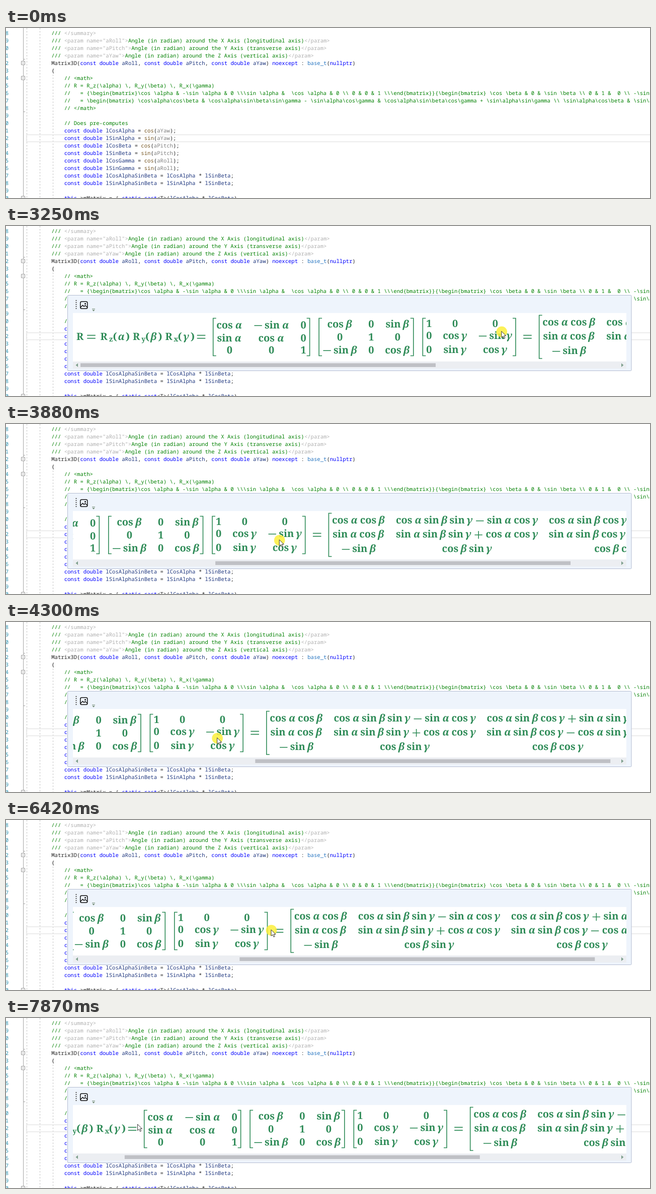
An HTML page for the animation above (8000 ms loop, 1280 by 340 pixels).

```html
<!DOCTYPE html>
<html lang="en">
<head>
<meta charset="utf-8">
<title>Formula preview in a code editor</title>
<style>
html, body { margin: 0; width: 100%; height: 100%; overflow: hidden; background: #fff; }
svg { display: block; }
text { white-space: pre; text-rendering: geometricPrecision; }
#code { font: 10.605px "Noto Sans Mono", monospace; }
#math { font: bold 20px "Noto Serif", serif; fill: #2e8b57; }
#math path { fill: none; stroke: #2e8b57; stroke-width: 1.6; }
#math .greek { font-style: italic; }
#math .sub { font-size: 14px; }
</style>
</head>
<body>
<svg width="1280" height="340" viewBox="0 0 1280 340">
  <clipPath id="view"><rect x="133" y="174" width="1100" height="96"/></clipPath>
  <path id="mark" fill="#eeeef7" stroke="#f0a0a0" visibility="hidden"
    d="M39.5 108.5H172.5V93.5H186.5V108.5H428.5V123.5H1290V153.5H180.5V168.5H39.5Z"/>
  <g fill="none" stroke="#c4c4c4">
    <path stroke-dasharray="3 3" d="M41.5 0V340M67.5 0V340M93.5 93V340"/>
    <path stroke="#e6e6e6" stroke-width="1.5" d="M1290 213.6H41V227.4H1290"/>
    <path stroke="#a5a5a5" d="M34.5 0V62.5H38M34.5 62V66M34.5 74V96M34.5 104V167.5H38M34.5 167V336"/>
    <path stroke="#999" id="folds"/>
  </g>
  <g id="code"></g>
  <g id="popup" visibility="hidden">
    <rect x="122.5" y="138.5" width="1120.5" height="151" rx="1.5" fill="#eef4fc" stroke="#b3bcd2"/>
    <rect x="133" y="174" width="1100" height="97" fill="#fff"/>
    <rect x="133" y="271" width="1100" height="14" fill="#eceef2"/>
    <path stroke="#555" stroke-width="2" stroke-dasharray="2 2" d="M139.5 148V167"/>
    <g fill="none" stroke="#111" stroke-width="1.5">
      <rect x="147.8" y="151.3" width="14" height="14" rx="2.5"/>
      <path d="M148 163L152.5 158.5L155 161L157.5 159L162 163"/>
      <circle cx="157.5" cy="155.5" r=".8"/>
    </g>
    <path fill="#5f7a5f" d="M171 165.5H177V166.5H171ZM171.5 168H176.5L174 170.5Z"/>
    <path fill="#7fa08e" d="M143 274.5V282L138.5 278.2ZM1223 274.5V282L1227.5 278.2Z"/>
    <rect id="thumb" x="148" y="274.5" width="706" height="7.5" fill="#bfc0c5"/>
    <g clip-path="url(#view)"><g id="math"></g></g>
  </g>
  <g id="mouse">
    <circle id="press" cx="1" cy="1.5" r="10.8" fill="#fbee3c" fill-opacity=".85" visibility="hidden"/>
    <path id="arrow" fill="#fff" stroke="#222" stroke-width=".9" visibility="hidden"
      d="M.5 .5V13L3.5 10.3L5.6 15L7.7 14L5.6 9.5H9.5Z"/>
    <path id="beam" fill="none" stroke="#111" visibility="hidden"
      d="M-2.5 -5.5H2.5M0 -5.5V5.5M-2.5 5.5H2.5"/>
  </g>
</svg>
<script>
const $ = id => document.getElementById(id);
const escapeText = s => String(s).replace(/&/g, '&amp;').replace(/</g, '&lt;');

// ---- editor text ----
const CHAR = 6.363, LEFT = 90.2, ROW = 15.03;
const lines = String.raw`/// </summary>
/// <param name="aRoll">Angle (in radian) around the X Axis (longitudinal axis)</param>
/// <param name="aPitch">Angle (in radian) around the Y Axis (transverse axis)</param>
/// <param name="aYaw">Angle (in radian) around the Z Axis (vertical axis)</param>
Matrix3D(const double aRoll, const double aPitch, const double aYaw) noexcept : base_t(nullptr)
{
    // <math>
    // R = R_z(\alpha) \, R_y(\beta) \, R_x(\gamma)
    //   = {\begin{bmatrix}\cos \alpha & -\sin \alpha & 0 \\\sin \alpha &  \cos \alpha & 0 \\ 0 & 0 & 1 \\\end{bmatrix}}{\begin{bmatrix} \cos \beta & 0 & \sin \beta \\ 0 & 1 &  0 \\ -\sin \beta
    //   = \begin{bmatrix} \cos\alpha\cos\beta & \cos\alpha\sin\beta\sin\gamma - \sin\alpha\cos\gamma & \cos\alpha\sin\beta\cos\gamma + \sin\alpha\sin\gamma \\ \sin\alpha\cos\beta & \sin\alpha\sin
    // </math>

    // Does pre-computes
    const double lCosAlpha = cos(aYaw);
    const double lSinAlpha = sin(aYaw);
    const double lCosBeta = cos(aPitch);
    const double lSinBeta = sin(aPitch);
    const double lCosGamma = cos(aRoll);
    const double lSinGamma = sin(aRoll);
    const double lCosAlphaSinBeta = lCosAlpha * lSinBeta;
    const double lSinAlphaSinBeta = lSinAlpha * lSinBeta;

    this->mMatrix = { static_cast<T>(lCosAlpha * lCosBeta),`.split('\n');

function tokenColor(token, line) {
  if (/^(const|double|noexcept|nullptr|this|static_cast)$/.test(token)) return '#0000ff';
  if (/^(cos|sin)$/.test(token)) return '#74531f';
  if (/^l[A-Z]/.test(token)) return '#1f377f';
  if (/^a[A-Z]/.test(token)) return line.includes('=') ? '#808080' : '#1f377f';
  return token === 'base_t' ? '#2474c0' : '#222';
}

function codeLine(line, row) {
  const y = 13.8 + row * ROW;
  const span = (s, x, color) => `<text x="${x}" y="${y}" fill="${color}">${escapeText(s)}</text>`;
  const comment = /^ *\/\//.test(line);
  const parts = line.split(comment ? /(<\/?(?:param|summary).*?>)/ : /(\w+)/);
  let col = 0, out = span((row + 8) % 10, -1.2, '#2b91af');
  parts.forEach((part, i) => {
    const color = comment ? (i % 2 ? '#b0b0b0' : '#008000') : tokenColor(part, line);
    const start = col + part.search(/\S|$/);
    if (part.trim()) out += span(part.trim(), LEFT + start * CHAR, color);
    col += part.length;
  });
  return out;
}
$('code').innerHTML = lines.map(codeLine).join('');
$('folds').setAttribute('d', [70, 100, 340].map(y => `M30.5 ${y - 3.5}h7v7h-7zM32 ${y}h4`).join(''));

// ---- formula ----
const EM = 21.2, THIN = EM / 6, PAD = 6.5;
const widths = { cos: 32.6, sin: 29.9, 'α': 16.1, 'β': 14, 'γ': 12.5, '-': 19, '+': 28.4, '–': 28.4, 0: 12.2, 1: 12.2 };
const minus = 'M-7.7 0h15.4';
const signs = { '-': minus, '–': minus, '+': minus + 'M0 -7.7v15.4', '=': 'M-8.3 -2.9h16.6M-8.3 3.1h16.6' };

const sign = (s, x, y) => `<path transform="translate(${x} ${y})" d="${signs[s]}"/>`;
const glyph = (s, x, y, cls = /[α-ω]/.test(s) ? 'greek' : '') =>
  `<text class="${cls}" text-anchor="middle" x="${x}" y="${y}">${s}</text>`;

// Binary signs carry their own spacing, other neighbours get a thin space.
const gap = (tokens, i) => i && !/[+–]/.test(tokens[i - 1] + tokens[i]) ? THIN : 0;
const measure = expr => expr.split(' ').reduce((sum, s, i, all) => sum + widths[s] + gap(all, i), 0);

function term(expr, center, y) {
  let pos = center - measure(expr) / 2;
  return expr.split(' ').map((s, i, all) => {
    pos += gap(all, i) + widths[s];
    const mid = pos - widths[s] / 2;
    return signs[s] ? sign(s, mid, y - 5.3) : glyph(s, mid, y);
  }).join('');
}

let pen = 411.7, formula = '';

// Columns are as wide as their widest cell, one em apart.
function matrix(top, bottom, bases, ...rows) {
  const cells = rows.map(row => row.split(','));
  const left = pen;
  pen += PAD;
  cells[0].forEach((_, c) => {
    const width = Math.max(...cells.map(row => measure(row[c])));
    cells.forEach((row, r) => formula += term(row[c], pen + width / 2, bases[r]));
    pen += width + EM;
  });
  pen += PAD - EM;
  formula += `<path d="M${left + 6} ${top}H${left}V${bottom}h6M${pen - 6} ${top}H${pen}V${bottom}h-6"/>`;
  pen += 18.5;
}

formula += glyph('R', 147, 228) + sign('=', 169.5, 221.5) + sign('=', 388, 221.5);
['zα', 'yβ', 'xγ'].forEach(([axis, angle], i) => {
  const x = 194.5 + 64.5 * i;
  formula += glyph('R', x, 228) + glyph(axis, x + 14.2, 231, 'sub') + glyph('(', x + 22, 228) +
    glyph(angle, x + 34.5, 228) + glyph(')', x + 47.5, 228);
});
matrix(184.5, 259.5, [204.5, 231, 254.5], 'cos α,- sin α,0', 'sin α,cos α,0', '0,0,1');
matrix(184.5, 259.5, [202.5, 229, 254.5], 'cos β,0,sin β', '0,1,0', '- sin β,0,cos β');
matrix(184.5, 259.5, [201.5, 225.5, 254], '1,0,0', '0,cos γ,- sin γ', '0,sin γ,cos γ');
formula += sign('=', 1036.5, 221.5);
pen = 1059.7;
matrix(178.5, 265, [199, 227, 256],
  'cos α cos β,cos α sin β sin γ – sin α cos γ,cos α sin β cos γ + sin α sin γ',
  'sin α cos β,sin α sin β sin γ + cos α cos γ,sin α sin β cos γ – cos α sin γ',
  '- sin β,cos β sin γ,cos β cos γ');
$('math').innerHTML = formula;

// ---- motion ----
const MAX_SCROLL = 567, END_SCROLL = 137;
const mousePath = [
  [660, 13, 165], [1010, 125, 131], [1820, 125, 131], [2560, 807, 210], [3040, 985, 210],
  [3250, 985, 210], [3880, 543, 231], [4400, 390, 231], [4860, 640, 223], [5070, 981, 214],
  [5300, 981, 219], [6010, 529, 219], [6230, 440, 219], [6760, 680, 219], [7100, 883, 214],
  [7660, 331, 212], [7870, 261, 212]];

function mouseAt(t) {
  const i = mousePath.findIndex(key => key[0] > t);
  if (i < 1) return mousePath.at(i).slice(1);
  const [t0, x0, y0] = mousePath[i - 1], [t1, x1, y1] = mousePath[i];
  const k = (t - t0) / (t1 - t0);
  return [x0 + (x1 - x0) * k, y0 + (y1 - y0) * k];
}

// The formula follows the pressed mouse until it meets its end.
function scrollAt(t, x) {
  const drag = from => Math.max(0, Math.min(MAX_SCROLL, from - x));
  if (t < 3250) return 0;
  if (t < 4400) return drag(961);
  if (t < 6230) return MAX_SCROLL;
  return t < 7100 ? drag(1020) : END_SCROLL;
}

const between = (t, a, b) => t >= a && t < b;
const show = (id, on) => $(id).setAttribute('visibility', on ? 'visible' : 'hidden');
const move = (id, x, y) => $(id).setAttribute('transform', `translate(${x} ${y})`);

function draw() {
  const t = performance.now() % 8000;
  const [x, y] = mouseAt(t), scroll = scrollAt(t, x);
  const beam = t < 1890 && x > 40;
  move('mouse', x, y);
  move('math', -scroll, 0);
  move('thumb', scroll * 0.641, 0);
  show('mark', between(t, 940, 1890));
  show('popup', t >= 1210);
  show('beam', t >= 660 && beam);
  show('arrow', t >= 660 && !beam);
  show('press', between(t, 3250, 4400) || between(t, 5270, 7100));
  requestAnimationFrame(draw);
}
draw();
</script>
</body>
</html>
```
